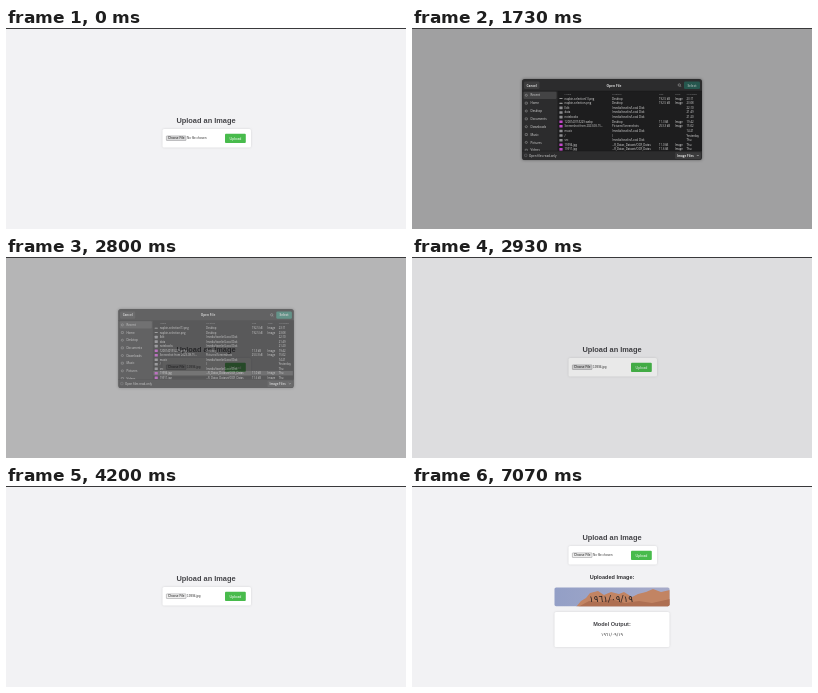
Recreate the animation shown at these times as an HTML page. Size 400 px wide and 201 px high, loop 7.6 s.

```html
<!DOCTYPE html>
<html lang="en">
<head>
<meta charset="utf-8">
<title>Image upload</title>
<style>
  html, body { margin: 0; width: 100%; height: 100%; overflow: hidden; background: #f2f2f4; }
  svg { display: block; width: 100vw; height: 100vh; }
  text { font-family: "Liberation Sans", Arial, sans-serif; white-space: pre; }
  .bold { font-weight: 700; }
  .ui text { font-family: "Open Sans", "Noto Sans", sans-serif; fill: #dedede; }
  .digits { font-family: "DejaVu Sans", sans-serif; }
  .card { fill: #fff; filter: drop-shadow(0 .5px 1px rgba(0, 0, 0, .13)); }
</style>
</head>
<body>
<svg id="stage" viewBox="0 0 400 201" preserveAspectRatio="none"></svg>
<script>
const LOOP = 7600;
const stage = document.getElementById('stage');

function add(parent, tag, attrs = {}, content) {
  const el = document.createElementNS('http://www.w3.org/2000/svg', tag);
  for (const key in attrs) el.setAttribute(key, attrs[key]);
  if (content !== undefined) el.textContent = content;
  return parent.appendChild(el);
}
const group = (parent, attrs) => add(parent, 'g', attrs);
const rect = (parent, x, y, width, height, fill, attrs) =>
  add(parent, 'rect', { x, y, width, height, fill, ...attrs });
const label = (parent, x, y, size, content, attrs) =>
  add(parent, 'text', { x, y, 'font-size': size, ...attrs }, content);
const path = (parent, d, attrs) => add(parent, 'path', { d, ...attrs });
const show = (el, visible) => el.setAttribute('display', visible ? 'inline' : 'none');
const shift = (el, y) => el.setAttribute('transform', `translate(0 ${y})`);
const clamp = v => Math.max(0, Math.min(1, v));
const MIDDLE = { 'text-anchor': 'middle' };
const TITLE = { ...MIDDLE, class: 'bold', fill: '#444448' };

rect(stage, 0, 0, 400, 201, '#f2f2f4');

// Upload form
const form = group(stage);
label(form, 200, 94.6, 7.4, 'Upload an Image', TITLE);
rect(form, 156.5, 101, 88.5, 18.6, '#fff', { rx: 1.6, class: 'card' });
const fileButton = rect(form, 160.4, 107.9, 19.6, 4.6, '#efefef',
  { rx: .5, stroke: '#77777a', 'stroke-width': .4 });
label(form, 170.2, 111.3, 3.09, 'Choose File', { ...MIDDLE, fill: '#111' });
const fileName = label(form, 181, 111.3, 3.09, '', { fill: '#333' });
rect(form, 219, 105.8, 20.8, 9.1, '#48bb4c', { rx: .9 });
label(form, 229.4, 111.6, 3.7, 'Upload', { ...MIDDLE, fill: '#fff' });

// Result below the form
const DATE = '١٩٦١/٠٩/١٩';
const result = group(stage);
const caption = label(result, 200, 102, 5.56, 'Uploaded Image:', { ...TITLE, fill: '#333336' });
const output = group(result);
const outputCard = rect(output, 177.5, 117, 46, 35, '#fff', { rx: 1.6, class: 'card' });
label(output, 200, 131, 5.56, 'Model Output:', TITLE);
label(output, 200, 141.3, 4.4, DATE, { ...MIDDLE, class: 'digits', fill: '#333' });

const photo = group(result);
const defs = add(stage, 'defs');
rect(add(defs, 'clipPath', { id: 'photoClip' }), 142.5, 101.5, 115, 18.7, '#000', { rx: 1.6 });
const sky = add(defs, 'linearGradient', { id: 'sky' });
add(sky, 'stop', { offset: 0, 'stop-color': '#939fc6' });
add(sky, 'stop', { offset: 1, 'stop-color': '#a7abc9' });
const scene = group(photo, { 'clip-path': 'url(#photoClip)' });
rect(scene, 142, 101, 116, 20, 'url(#sky)');
path(scene, 'M164 121L169 115L174 112L178 107L186 105L192 109L199 106L207 108L212 106L220 111L226 108L234 106L241 103L249 106L258 104V121Z',
  { fill: '#c28463' });
path(scene, 'M166 121L177 115L188 116L199 113L213 117L227 115L240 117L258 113V121Z', { fill: '#ae6f52' });
label(photo, 199, 116.4, 8.9, DATE, { ...MIDDLE, class: 'digits', fill: '#2b2424' });

const shade = rect(stage, 0, 1, 400, 200, '#000');
rect(stage, 0, 0, 400, 1, '#39393b');

// File dialog
const dialog = group(stage, { class: 'ui' });
rect(dialog, 110, 51, 180, 81, '#2c2c2d',
  { rx: 2.6, style: 'filter:drop-shadow(0 .8px 1.5px rgba(0,0,0,.4))' });
rect(dialog, 112, 53.6, 15.5, 7.4, '#3d3d3e', { rx: 1.3 });
label(dialog, 119.7, 58.5, 3.1, 'Cancel', { ...MIDDLE, class: 'bold' });
label(dialog, 202, 58.5, 3.2, 'Open File', { ...MIDDLE, class: 'bold' });
path(dialog, 'M268.1 57.9L269 58.8M268.5 57a1.2 1.2 0 1 1-2.4 0a1.2 1.2 0 1 1 2.4 0',
  { fill: 'none', stroke: '#bbb', 'stroke-width': .45 });
const selectButton = rect(dialog, 272, 53.6, 16, 7.4, '#26574e', { rx: 1.3 });
const selectLabel = label(dialog, 280, 58.5, 3.1, 'Select', { ...MIDDLE, class: 'bold' });

rect(dialog, 145.5, 63, 144.5, 60, '#1d1d1e');
rect(dialog, 110, 62.8, 180, .4, '#171718');
rect(add(defs, 'clipPath', { id: 'listClip' }), 110, 63, 180, 60, '#000');
const list = group(dialog, { 'clip-path': 'url(#listClip)' });

const PLACES = ['Recent', 'Home', 'Desktop', 'Documents', 'Downloads', 'Music', 'Pictures', 'Videos'];
const placeY = i => 67.3 + i * 7.85;
rect(list, 111.5, placeY(0) - 3.6, 33, 7.2, '#444445', { rx: 1 });
const placeHover = rect(list, 111.5, placeY(3) - 3.6, 33, 7.2, '#3c3c3d', { rx: 1 });
PLACES.forEach((name, i) => {
  rect(list, 113.2, placeY(i) - 1, 2.2, 2, 'none', { rx: i % 2 ? .3 : 1, stroke: '#c4c4c4', 'stroke-width': .4 });
  label(list, 118.5, placeY(i) + 1.1, 3, name);
});

const COLUMNS = [152.5, 200, 247, 263, 274.5];
['Name', 'Location', 'Size', 'Type', 'Accessed'].forEach((name, i) =>
  label(list, COLUMNS[i], 66.5, 2.4, name, { style: 'fill:#8f8f91' }));

const DISK = '/media/tovelin/Local Disk';
const SCANS = '…R_Datas_Dataset/OCR_Datas';
const FILES = [
  ['napkin-selection(1).png', 'Desktop', '192.5 kB', 'Image', '23:11'],
  ['napkin-selection.png', 'Desktop', '192.5 kB', 'Image', '23:08'],
  ['Edit', DISK, '', '', '22:10'],
  ['data', DISK, '', '', '21:49'],
  ['notebooks', DISK, '', '', '21:20'],
  ['1200140155229.webp', 'Desktop', '11.3 kB', 'Image', '19:42'],
  ['Screenshot from 2023-08-15…', 'Pictures/Screenshots', '253.3 kB', 'Image', '15:02'],
  ['music', DISK, '', '', '14:21'],
  ['/', '/', '', '', 'Yesterday'],
  ['src', DISK, '', '', 'Thu'],
  ['19994.jpg', SCANS, '11.0 kB', 'Image', 'Thu'],
  ['19911.jpg', SCANS, '11.6 kB', 'Image', 'Thu'],
];
const rowY = i => 70.6 + i * 4.62;
const selection = rect(list, 146, rowY(10) - 2.3, 143, 4.6, '#454546');
FILES.forEach((file, row) => {
  const isImage = file[3] === 'Image';
  const color = !isImage ? '#8d8d90' : row < 2 ? '#b9b9b9' : '#c247c9';
  rect(list, 147.4, rowY(row) - (row < 2 ? .4 : 1.3), 3.2, row < 2 ? .9 : 2.6, color, { rx: .3 });
  file.forEach((value, i) => label(list, COLUMNS[i], rowY(row) + 1, 2.75, value));
});

rect(dialog, 110, 122.8, 180, .4, '#171718');
rect(dialog, 112.6, 126.2, 2.4, 2.4, 'none', { rx: .5, stroke: '#858587', 'stroke-width': .4 });
label(dialog, 117, 128.5, 2.95, 'Open files read-only');
rect(dialog, 263, 124.2, 26, 6.8, '#3b3b3c', { rx: 1.2 });
label(dialog, 265, 128.6, 3, 'Image Files', { class: 'bold' });
path(dialog, 'M284.8 127l1 1l1-1', { fill: 'none', stroke: '#ddd', 'stroke-width': .5 });

function render(t) {
  // The screen refreshes 15 times a second
  const tick = Math.floor((t + 5) * .015);
  const opening = clamp((tick - 8) / 12);
  const closing = clamp((tick - 41) / 4);
  shade.setAttribute('opacity', .34 * (opening - closing));

  const alpha = clamp((tick - 9) / 4) * (1 - clamp((tick - 41) / 2.5));
  const scale = .94 + .06 * alpha;
  show(dialog, alpha > 0);
  dialog.setAttribute('opacity', alpha);
  dialog.setAttribute('transform', `translate(200 91.5) scale(${scale}) translate(-200 -91.5)`);

  const selected = t >= 2400;
  show(placeHover, t < 1400);
  show(selection, selected);
  selectButton.setAttribute('fill', selected ? '#2f7d6c' : '#26574e');
  selectLabel.setAttribute('opacity', selected ? 1 : .6);

  const submitted = t >= 6470;
  const loaded = t >= 6530;
  shift(form, loaded ? -41 : submitted ? -31.8 : 0);
  fileName.textContent = t >= 2800 && !submitted ? '19994.jpg' : 'No file chosen';
  fileButton.setAttribute('fill', t < 3600 ? '#dcdcdd' : '#efefef');

  show(result, submitted);
  show(photo, loaded);
  shift(caption, loaded ? -9 : 0);
  shift(output, loaded ? 9 : 0);
  outputCard.setAttribute('x', loaded ? 142.5 : 177.5);
  outputCard.setAttribute('width', loaded ? 115 : 46);
}

function loop() {
  render(performance.now() % LOOP);
  requestAnimationFrame(loop);
}
loop();
</script>
</body>
</html>
```
